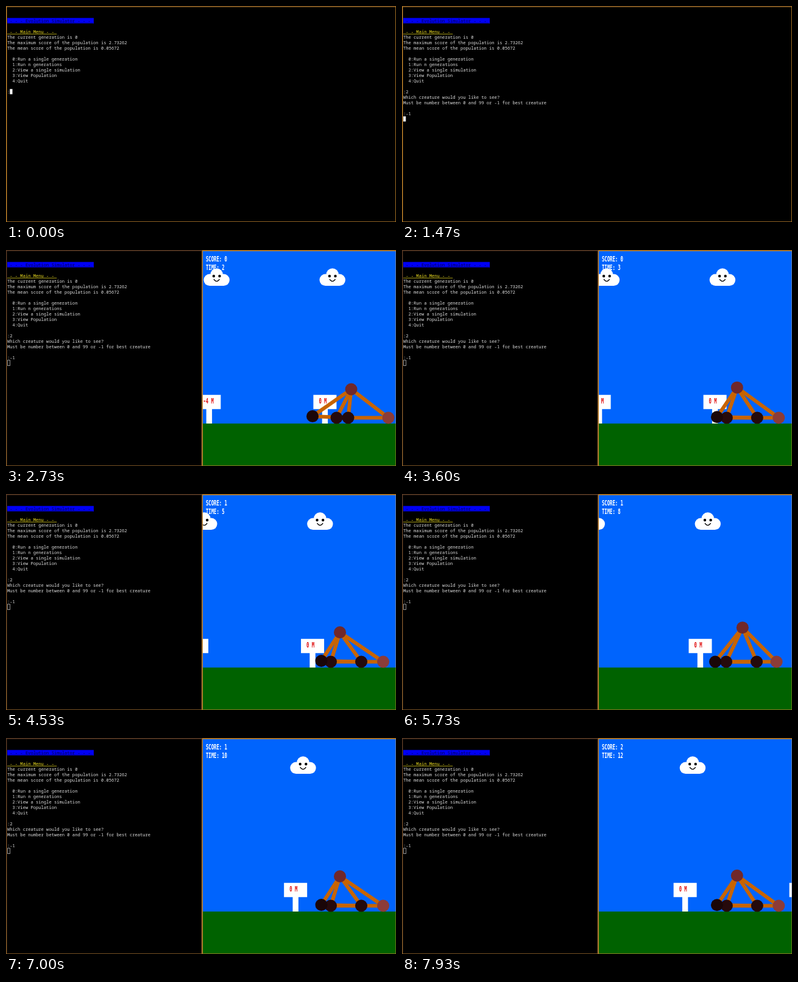
Animation, 640 px wide and 356 px high, one loop 8000 ms. Source, as an HTML page:

```html
<!DOCTYPE html>
<html lang="en">
<head>
<meta charset="utf-8">
<title>Creature simulation</title>
<style>
  html, body { margin: 0; width: 100%; height: 100%; overflow: hidden; background: #000; }
  svg { display: block; width: 640px; height: 356px; }
  text { white-space: pre; }
  .term { font: 7.14px "Noto Sans Mono", "DejaVu Sans Mono", monospace; fill: #dedede; }
  .title { fill: #00004c; text-decoration: underline; }
  .menu { fill: #f0e020; text-decoration: underline; }
  .hud { font: bold 13px "DejaVu Sans Mono", "Liberation Mono", monospace; fill: #fff; }
  .mark { font: bold 12.5px "DejaVu Sans Mono", "Liberation Mono", monospace; fill: #e01010; }
</style>
</head>
<body>
<svg viewBox="0 0 640 356">
  <defs>
    <linearGradient id="desk" x2="0" y2="1">
      <stop offset="0" stop-color="#5c3c26"/>
      <stop offset="1" stop-color="#94652e"/>
    </linearGradient>
    <clipPath id="view"><rect x="323" y="2" width="316.5" height="353.3"/></clipPath>
    <g id="cloud">
      <g fill="#fff">
        <circle cx="-11.5" cy="49.3" r="9.7"/>
        <circle cx="11.5" cy="49.3" r="9.7"/>
        <rect x="-11.5" y="43" width="23" height="16"/>
        <circle cy="40.5" r="10.2"/>
      </g>
      <circle cx="-4.8" cy="43" r="2.2"/>
      <circle cx="4.8" cy="43" r="2.2"/>
      <path d="M-4.8 48.2Q0 55 4.8 48.2" fill="none" stroke="#000" stroke-width="1.4"/>
    </g>
    <path id="board" d="M-19 238.7H19V262.2H4.7V286H-4.7V262.2H-19Z" fill="#fff"/>
  </defs>

  <rect width="640" height="356" fill="url(#desk)"/>
  <rect id="focus" y=".6" height="355" fill="#c98a2c"/>
  <rect id="shell" x="1.4" y="1.6" height="353.6"/>
  <rect x="2" y="19.7" width="142" height="9.2" fill="#0000f4"/>
  <g id="term" class="term"></g>
  <rect id="cursor" width="4.3" height="8.6" stroke-width=".7"/>

  <g id="sim" clip-path="url(#view)">
    <rect x="323" y="2" width="317" height="284" fill="#0064fd"/>
    <rect x="323" y="286" width="317" height="70" fill="#006200"/>
    <g id="world"></g>
    <g id="bones" stroke="#c86400" stroke-width="6"></g>
    <g id="joints"></g>
    <text id="score" class="hud" transform="translate(328 18.7) scale(.56 1)"></text>
    <text id="time" class="hud" transform="translate(328 32.9) scale(.56 1)"></text>
  </g>
</svg>
<script>
const LOOP = 8000, STEP = 1000 / 15;
const PITCH = 4.285, ROW = 9, LEFT = 2, TOP_ROW = 3;
const OPEN = 1470, START = 1602, TOUCH = 1868, DOWN = 2733;
const SIM_RATE = 1.95, METRE = 47.5, CENTRE = 560, FLOOR = 276.5;
const GAIT = 823, SPEED = 11.3, SPIN = 2.04, DROP = 58;
const $ = id => document.getElementById(id);

function set(el, attrs) {
  for (const k in attrs) el.setAttribute(k, attrs[k]);
  return el;
}
function add(parent, tag, attrs, text = "") {
  const el = set(document.createElementNS("http://www.w3.org/2000/svg", tag), attrs);
  el.textContent = text;
  return parent.appendChild(el);
}

// Progress from a to b, clamped; ease smooths it
const ramp = (t, a, b) => Math.max(0, Math.min(1, (t - a) / (b - a)));
const ease = u => u * u * (3 - 2 * u);

// Terminal
const menu = [
  " - - - Evolution Simulator - - - ",
  "",
  " - - Main Menu - - ",
  "The current generation is 0",
  "The maximum score of the population is 2.73262",
  "The mean score of the population is 0.05672",
  "",
  "  0:Run a single generation",
  "  1:Run n generations",
  "  2:View a single simulation",
  "  3:View Population",
  "  4:Quit",
  ""
];
const question = [
  "Which creature would you like to see?",
  "Must be number between 0 and 99 or -1 for best creature",
  ""
];
const typed = (text, from, t) => ":" + text.slice(0, Math.max(0, Math.ceil((t - from) / 130)));

function screen(t) {
  const rows = [...menu, typed("2", 320, t)];
  if (t >= 660) rows.push(...question, typed("-1", 990, t));
  if (t >= 1330) rows.push("");
  return rows;
}

const baseline = i => (i + TOP_ROW) * ROW - .2;
const rowEls = screen(LOOP).map((_, i) =>
  add($("term"), "text", { x: LEFT, y: baseline(i), class: ["title", "", "menu"][i] || "" }));

function drawTerminal(t) {
  const open = t >= OPEN, rows = screen(t), last = rows.length - 1;
  rowEls.forEach((el, i) => el.textContent = rows[i] || "");
  set($("focus"), open ? { x: 322, width: 318 } : { x: 0, width: 640 });
  set($("shell"), { width: open ? 319.3 : 637.8 });
  set($("cursor"), {
    x: LEFT + rows[last].length * PITCH + (open ? .4 : 0), y: baseline(last) - 7,
    fill: open ? "none" : "#f4f4f4", stroke: open ? "#d0d0d0" : "none"
  });
}

// Scenery, placed relative to the zero mark
for (let m = -4; m <= 4; m += 4) {
  const g = add($("world"), "g", { transform: `translate(${m * METRE} 0)` });
  add(g, "use", { href: "#cloud", x: 12.3 });
  add(g, "use", { href: "#board" });
  add(g, "text", { class: "mark", transform: "translate(-10 252.6) scale(.58 1)" }, m + " M");
}

// Creature: joints as [x, y], bones as pairs of joints
const bones = [[0, 1], [0, 2], [1, 2], [1, 3], [1, 4], [3, 4]];
const colours = ["#8c3c38", "#70282a", "#260a0c", "#1a0608", "#240a0c"];
const upright = [[549.5, 138], [532.5, 236], [587, 227], [594, 260], [537, 276.5]];
const sprawl = [[627.5, 276.5], [566.5, 229.5], [542.5, 276.5], [503, 274], [561.5, 276.5]];
const tight = [[619, 276.5], [548, 228], [533, 276.5], [517.5, 275], [583, 276.5]];
const wide = [[614.5, 276.5], [559, 220], [532, 276.5], [514, 276.5], [582, 276.5]];

const mix = (p, q, u) => p.map(([x, y], i) => [x + (q[i][0] - x) * u, y + (q[i][1] - y) * u]);

function turn(p, angle) {
  const cy = p.reduce((sum, [, y]) => sum + y, 0) / p.length;
  const c = Math.cos(angle), s = Math.sin(angle);
  return p.map(([x, y]) => [
    CENTRE + (x - CENTRE) * c - (y - cy) * s,
    cy + (x - CENTRE) * s + (y - cy) * c
  ]);
}

// Drops, topples to the right, then walks
function pose(t) {
  if (t < DOWN) {
    const u = ease(ramp(t, TOUCH, DOWN));
    const p = mix(turn(upright, u * SPIN), turn(sprawl, (u - 1) * SPIN), u);
    const height = DROP * (1 - ramp(t, START, TOUCH) ** 2);
    const lift = FLOOR - height - Math.max(...p.map(j => j[1]));
    return p.map(([x, y]) => [x, y + lift]);
  }
  const reach = (1 - Math.cos((t - 4533) / GAIT * 2 * Math.PI)) / 2;
  return mix(sprawl, mix(tight, wide, reach), ease(ramp(t, DOWN, DOWN + GAIT / 2)));
}

const boneEls = bones.map(() => add($("bones"), "line", {}));
const jointEls = colours.map(fill => add($("joints"), "circle", { r: 10, fill }));

function drawSim(t) {
  $("sim").style.display = t >= OPEN ? "" : "none";
  if (t < OPEN) return;
  const zero = 564 - 40.6 * ease(ramp(t, TOUCH, DOWN)) - SPEED * Math.max(0, t - DOWN) / 1000;
  set($("world"), { transform: `translate(${zero} 0)` });
  const p = pose(t);
  bones.forEach(([a, b], i) => set(boneEls[i], { x1: p[a][0], y1: p[a][1], x2: p[b][0], y2: p[b][1] }));
  jointEls.forEach((el, i) => set(el, { cx: p[i][0], cy: p[i][1] }));
  $("score").textContent = "SCORE: " + Math.max(0, Math.floor((CENTRE - zero) / METRE));
  $("time").textContent = "TIME: " + Math.max(0, Math.floor((t - START) / 1000 * SIM_RATE));
}

const begin = performance.now();
function frame() {
  const now = (performance.now() - begin) % LOOP;
  const t = Math.floor((now + 5) / STEP) * STEP % LOOP;
  drawTerminal(t);
  drawSim(t);
  requestAnimationFrame(frame);
}
frame();
</script>
</body>
</html>
```
